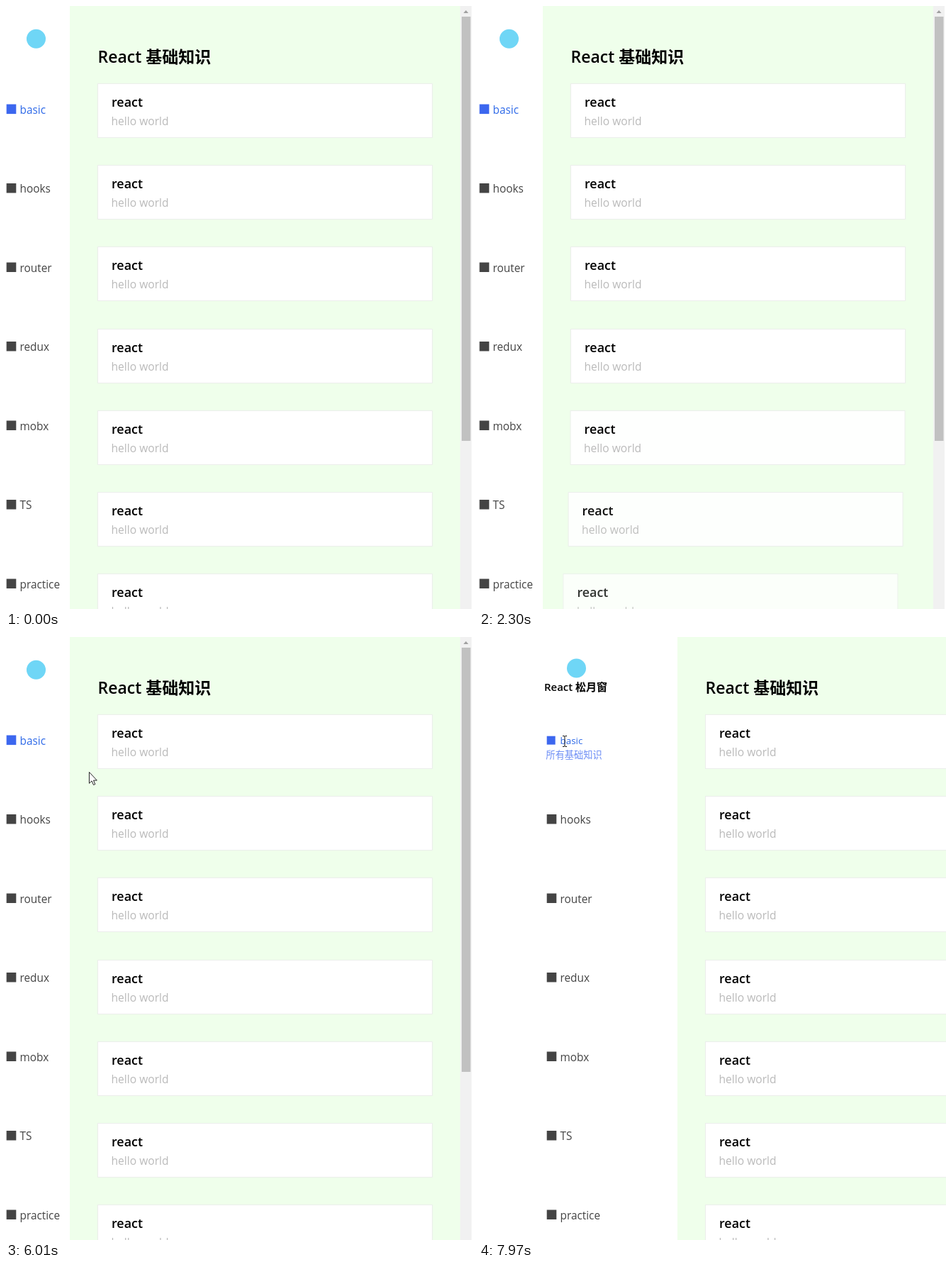
These frames come from a looping animation (659 px wide and 850 px high, 8000 ms). An HTML page:

```html
<!DOCTYPE html>
<html lang="zh-CN">
<head>
<meta charset="utf-8">
<title>React 基础知识</title>
<style>
  html, body { margin: 0; width: 100%; height: 100%; overflow: hidden; background: #fff; }
  svg { display: block; }
  text { font-family: "Open Sans", "Noto Sans CJK SC", "Noto Sans CJK", sans-serif; white-space: pre; }
  .heading { font-size: 23px; font-weight: 600; }
  .title { font-size: 17.9px; font-weight: 600; }
  .body { font-size: 15.6px; fill: #bababa; }
  .nav { font-size: 15.4px; fill: #444; }
  .brand { font-size: 15px; font-weight: 600; text-anchor: middle; }
  .caption { font-size: 13.2px; fill: #5c80f4; }
</style>
</head>
<body>
<svg width="659" height="850" viewBox="0 0 659 850">
  <g id="main">
    <rect x="90" width="551" height="850" fill="#efffeb"/>
    <text class="heading" x="129.5" y="79.5">React 基础知识</text>
    <g id="cards"></g>
    <rect x="641" width="16" height="850" fill="#f1f1f1"/>
    <path d="M645.5 10l3.5-4 3.5 4z" fill="#a0a0a0"/>
    <rect x="643" y="15" width="12.5" height="598" fill="#c1c1c1"/>
  </g>
  <rect id="side" height="850" fill="#fff"/>
  <g id="menu">
    <circle id="logo" cx="42.5" r="13.5" fill="#6fd6f6"/>
    <text id="brand" class="brand" x="41.5">React 松月窗</text>
    <g id="nav"></g>
    <text id="caption" class="caption" x="-0.5" y="171">所有基础知识</text>
  </g>
  <path id="arrow" d="M.5.5v15.8l3.6-3.4 2.5 5.6 2.3-1-2.4-5.4h4.9z" fill="#fff" stroke="#222"/>
  <path id="beam" d="M-3 -7.5h2.2l.8.8.8-.8H3M0 -7V7M-3 7.5h2.2l.8-.8.8.8H3" fill="none" stroke="#111"/>
</svg>
<script>
const LOOP = 8000;
const $ = id => document.getElementById(id);
const clamp = v => Math.min(1, Math.max(0, v));
const mix = (a, b, p) => a + (b - a) * p;
const set = (el, attrs) => { for (const k in attrs) el.setAttribute(k, attrs[k]); };

// CSS "ease": cubic-bezier(.25, .1, .25, 1)
function ease(x) {
  x = clamp(x);
  const bezier = (a, b, s) => 3 * a * s * (1 - s) ** 2 + 3 * b * s * s * (1 - s) + s ** 3;
  let lo = 0, hi = 1;
  for (let i = 0; i < 22; i++) {
    const mid = (lo + hi) / 2;
    if (bezier(.25, .25, mid) < x) lo = mid; else hi = mid;
  }
  return bezier(.1, 1, lo);
}
const tween = (t, start, duration) => ease((t - start) / duration);

const CARD_COUNT = 7, CARD_START = 516, CARD_DELAY = 210, CARD_TIME = 1080, CARD_SLIDE = 50;
$('cards').innerHTML = Array.from({ length: CARD_COUNT }, (_, i) => {
  const y = Math.round(109 + 115.2 * i);
  return `<g><rect x="129.5" y="${y + .5}" width="472" height="76" fill="#fff" stroke="#ebeeeb"/>
    <text class="title" x="149" y="${y + 33}">react</text>
    <text class="body" x="148.5" y="${y + 59}">hello world</text></g>`;
}).join('');

$('nav').innerHTML = ['basic', 'hooks', 'router', 'redux', 'mobx', 'TS', 'practice'].map((name, i) => {
  const y = 146 + 111.5 * i;
  return `<g><rect x="0.7" y="${y - 7.5}" width="13.6" height="13.5" fill="#444"/>
    <text class="nav" x="19.5" y="${y + 5.7}">${name}</text></g>`;
}).join('');
const [activeIcon, activeText] = $('nav').firstElementChild.children;
activeIcon.style.fill = '#3c67ef';
activeText.style.fill = '#2f6ae8';

// Pointer path: time, x, y
const POINTER = [
  [3420, 585, 215], [3600, 480, 178], [3760, 385, 172], [3950, 300, 320], [4130, 257, 402],
  [4300, 250, 385], [4540, 234, 308], [4800, 200, 580], [5000, 178, 680], [5400, 165, 740],
  [5700, 168, 590], [6010, 117, 190], [6300, 100, 191], [6500, 66, 192], [6630, 58, 192],
  [6850, 60, 192], [7350, 121, 147], [LOOP, 121, 147]
];
function pointerAt(t) {
  const i = POINTER.findIndex(p => p[0] > t);
  const [t0, x0, y0] = POINTER[i - 1], [t1, x1, y1] = POINTER[i];
  const p = (t - t0) / (t1 - t0);
  return [mix(x0, x1, p), mix(y0, y1, p)];
}

function draw(t) {
  [...$('cards').children].forEach((card, i) => {
    const p = t < 500 ? 1 : tween(t, CARD_START + i * CARD_DELAY, CARD_TIME);
    set(card, { opacity: p, transform: `translate(${(p - 1) * CARD_SLIDE} 0)` });
  });

  const open = tween(t, 6390, 600);
  const shift = 190 * open;
  set($('main'), { transform: `translate(${shift} 0)` });
  set($('side'), { width: 90 + shift });
  set($('menu'), { transform: `translate(${shift / 2} 0)` });
  set($('logo'), { cy: mix(46.3, 44, open) });
  set($('brand'), { y: mix(92, 76, open), opacity: open });

  const hover = tween(t, 7600, 600);
  const size = mix(13.6, 11.8, hover);
  set(activeIcon, { width: size, height: size, y: mix(138.5, 139.8, hover) });
  set(activeText, { y: mix(151.7, 150.8, hover) });
  activeText.style.fontSize = mix(15.4, 13.2, hover) + 'px';
  set($('caption'), { opacity: hover });

  const visible = t >= POINTER[0][0], overText = t >= 7350;
  const [x, y] = visible ? pointerAt(t) : [0, 0];
  const transform = `translate(${x} ${y})`;
  set($('arrow'), { transform, opacity: +(visible && !overText) });
  set($('beam'), { transform, opacity: +overText });
}

const start = performance.now();
function frame() {
  draw((performance.now() - start) % LOOP);
  requestAnimationFrame(frame);
}
frame();
</script>
</body>
</html>
```
